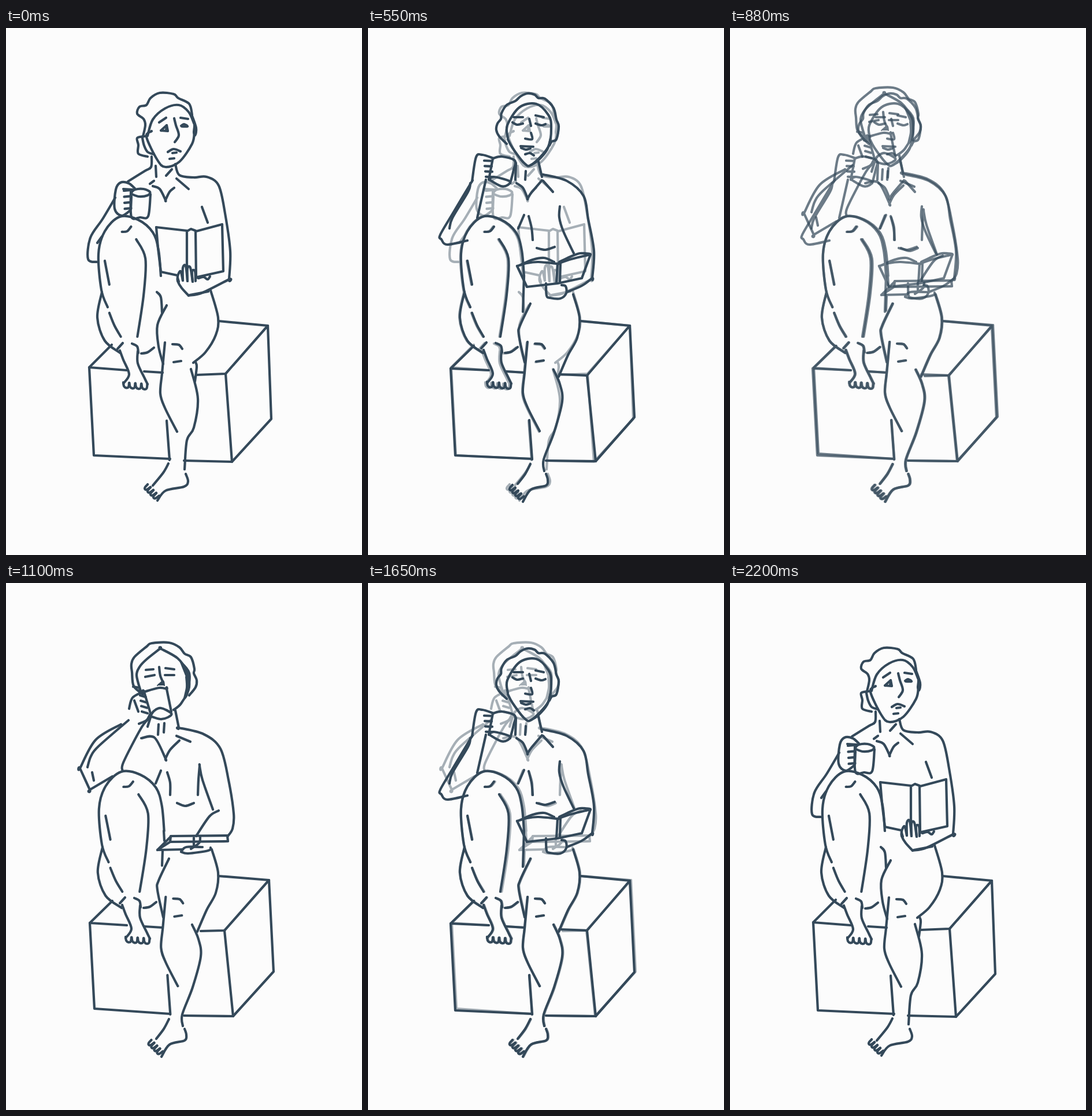
These frames come from a looping animation (616 px wide and 910 px high, 2420 ms). An HTML page:

```html
<!DOCTYPE html>
<html lang="en">
<head>
<meta charset="utf-8">
<title>Reader with a cup</title>
<style>
  html, body { margin: 0; width: 100%; height: 100%; overflow: hidden; background: #fcfcfc; }
  svg { display: block; width: 616px; height: 910px; }
  path { fill: none; stroke: #34495a; stroke-width: 4.2; stroke-linecap: round; stroke-linejoin: round; }
  path.solid { fill: #34495a; stroke-width: 2; }
</style>
</head>
<body>
<svg viewBox="0 0 616 910"></svg>
<script>
const stage = document.querySelector("svg");
const make = (tag, parent) =>
  parent.appendChild(document.createElementNS("http://www.w3.org/2000/svg", tag));
const [rest, lift, sip] = Array.from({ length: 3 }, () => make("g", stage));

function smooth(pts) {
  const at = i => pts[Math.max(0, Math.min(pts.length - 1, i))];
  const near = (p, a, b, k) => p.map((v, j) => (v + k * (b[j] - a[j]) / 6).toFixed(1));
  let d = "M" + pts[0];
  for (let i = 0; i < pts.length - 1; i++) {
    d += "C" + near(at(i), at(i - 1), at(i + 1), 1) + " "
      + near(at(i + 1), at(i), at(i + 2), -1) + " " + at(i + 1);
  }
  return d;
}

function trace(layer, pts, mark) {
  const path = make("path", layer);
  path.setAttribute("d", mark === "!" ? "M" + pts.join("L") : smooth(pts));
  if (mark === "#") path.classList.add("solid");
}

// Strokes are split by ";". "!" = straight lines, "#" = solid shape, otherwise a smooth curve.
function draw(layer, strokes, dx = 0, dy = 0, sx = 1) {
  for (const text of strokes.split(";")) {
    const pts = text.match(/\d+ \d+/g).map(pair => {
      const [x, y] = pair.split(" ").map(Number);
      return [164 + (x - 164) * sx + dx, y + dy];
    });
    trace(layer, pts, text.trim()[0]);
  }
}

function fingers(layer, x, y, dx, dy, w, h) {
  for (let i = 0; i < 4; i++) trace(layer, [[x + i * dx, y + i * dy], [x + i * dx + w, y + i * dy + h]]);
}

// Four small loops in a row, bulging towards (outX, outY).
function toes(layer, x, y, dx, dy, outX, outY) {
  for (let i = 0; i < 4; i++) {
    const point = (along, out) => [x + (i + along) * dx + out * outX, y + (i + along) * dy + out * outY];
    trace(layer, [point(0, 0), point(.1, .7), point(.45, 1), point(.85, .8), point(.95, 0)]);
  }
}

// Corner names: back left, front left, bottom left, bottom right, front right, far right, far bottom.
function box(layer, back, left, low, base, front, far, end, gap) {
  draw(layer, `!${back};!${left} 209 591;!239 593 271 595;!${gap} ${front} ${far} 368 506;
    !${left} ${low} 284 744;!308 747 ${base} ${front};!${base} ${end} ${far}`.replace(`!${back};!`, `!${back} `));
}

// Cup resting, book upright
draw(rest, `237 187 241 168 238 157 227 148 231 136 243 133 250 121 266 112 290 114 298 121 317 131 322 150;
  245 186 254 158 275 139 299 133 316 145 325 164;#321 146 330 172 328 186 324 181 325 168 322 156`);
draw(rest, `326 180 322 200 300 231 276 240 262 228 243 188 252 178;
  240 187 227 190 229 202 229 217 245 222;236 190 239 203 245 214 256 218`);
draw(rest, `265 163 277 155;!268 177 278 168 280 178 268 177;!278 168 277 177;302 155 315 157;
  303 169 308 166 314 170 304 170;291 156 294 168 299 185 292 197;280 214 290 209 302 213;288 216 295 215;283 226 291 225`);
draw(rest, `252 222 251 240 240 247 211 265;259 238 260 257;
  293 235 300 254 325 258 347 257 368 272 379 320 388 385 386 434 386 434 340 457 316 462;
  287 244 277 255;254 273 266 278 276 297 276 297 283 283 291 276;295 260 316 278;249 269 256 264;339 309 349 336`);
draw(rest, `216 283 217 326 232 327 246 325 250 287;217 284 223 279 238 278 249 283 245 289 230 291 218 287;
  223 277 212 268 198 267 190 279 188 312 200 324 215 315;203 278 219 279;217 291 216 313`);
fingers(rest, 204, 281, .5, 10.4, 11, -1);
draw(rest, `189 293 167 330 146 362 142 399 158 404;166 360 158 371`);
draw(rest, `!260 344 313 350;!260 344 263 380 268 421 296 427;!313 412 313 351 320 347 328 350 329 432;
  !329 351 374 339 376 420 331 430;299 438 297 429 302 420 306 436;306 436 306 414 311 411 314 437;
  314 437 314 415 319 414 323 438;323 438 322 420 327 420 328 437`);
draw(rest, `297 430 297 437 304 449 316 462;318 461 350 455;333 432 342 430 349 434 353 429;
  261 456 268 465 270 491;278 479 262 513 264 550 272 580;354 453 367 500 363 530 345 560 324 578`);
draw(rest, `320 589 332 640 325 690 313 712 309 762;328 577 330 585 327 610;
  281 752 272 768 254 790;311 770 315 783 308 792 276 799 262 816`);

// Cup raised, book lowered
draw(lift, `240 200 227 187 222 176 224 165 230 157 231 147 240 133 255 126 264 118 276 113 288 115 295 121 306 122
  321 138 326 158 330 170 326 192 318 196 314 203`);
draw(lift, `242 190 241 168 262 137 291 131 312 150 317 170 312 205 283 236 270 233 250 207 242 192;
  316 190 310 210 294 229 281 237`);
draw(lift, `252 154 268 154;290 151 304 154;250 163 258 167 268 165;290 165 300 168 307 166;279 157 282 169;
  282 181 284 192 272 191;264 204 286 205;265 207 273 210 281 208;272 218 280 216 287 220`);
draw(lift, `256 233 255 262;273 247 272 262;295 231 301 257;257 268 268 276 276 294 276 294 283 284 301 263;303 264 320 283;
  303 253 344 264 373 290 381 330 391 385 388 432 388 432 370 445 344 456;332 308 331 327 338 351 356 389;
  270 323 260 346;278 325 283 345 285 366;292 380 307 383 323 378`);
draw(lift, `216 225 232 222 254 229 252 245 246 268;216 225 209 262;210 262 217 257 244 264 242 271 230 273 210 262;
  217 225 198 219 187 223 180 265`);
fingers(lift, 201, 229, 1, 9.3, 12, .5);
draw(lift, `181 263 148 318 125 357 127 365 137 374 172 367;177 268 173 283 146 328 141 346;204 262 189 328`);
draw(lift, `!258 411 275 447 328 441 370 432 385 391;258 411 275 406 295 404 328 407 328 407 352 399 385 391;
  264 409 285 400 305 397 322 404;331 404 350 395 367 389 384 390;!328 407 326 441;!333 406 332 439;
  308 441 309 462 315 466 333 467 343 458 342 446 335 444`);

// Drinking, book flat
draw(sip, `237 192 221 178 218 154 217 140 222 128 243 110 252 104 282 103 300 111 309 122 320 128 326 148 325 156
  330 168 328 180 317 194`);
draw(sip, `234 190 226 160 231 145 243 132 267 113 267 113 297 130 312 152 317 180 303 208 290 219;
  #299 132 318 155 315 190 308 200 312 180 311 162;220 179 230 181 233 187;
  242 150 255 149;276 147 291 149;241 162 257 159;275 159 291 159;265 145 267 160 272 172;#262 177 272 169 274 177`);
draw(sip, `250 232 245 248;264 244 263 262;274 242 273 258;
  293 220 299 250 299 250 342 261 371 286 385 340 394 398 392 424 384 437;
  234 268 257 267 276 303 276 303 284 288 300 272;295 264 319 274;
  332 366 333 340 335 316 335 316 340 340 358 391;368 393 352 403 329 437`);
draw(sip, `268 324 259 346;279 327 284 345 284 366;296 380 310 385 325 380;
  250 225 239 188 239 188 265 181 278 183 278 183 286 222;250 230 256 221 268 216 286 225 280 232 267 235 250 230;
  213 217 219 198 239 187;222 203 229 222;230 243 243 237 249 227`);
fingers(sip, 232, 194, 1, 9.3, 10, 3);
draw(sip, `212 237 160 282 147 299 141 318;199 244 155 271 128 320 128 320 145 357 145 357 184 334;
  149 327 152 341;246 235 233 252 203 310 202 325`);
draw(sip, `!285 437 383 436 384 446 284 447 285 437;!285 438 262 461 306 460;!262 461 284 447;
  303 464 312 456 340 456;303 464 315 467 350 462 354 457;325 440 325 455;336 439 334 449 320 459`);

// Parts that hardly move, with a small shift or stretch for each pose
const bentLeg = `270 428 266 384 256 353 230 331 198 326 172 351 161 390 166 452 177 482;
  167 456 159 500 172 540 199 561;172 402 180 443;180 492 189 514 200 533;202 352 211 351 218 343;
  227 365 243 398 240 460 229 533`;
const ankle = `196 553 205 543;221 544 230 549 232 560;200 556 206 572 216 597 206 613;
  231 557 231 578 243 604 248 614;237 561 248 559 259 551`;
const shin = `276 542 271 595 268 630 276 655 297 696;289 545 300 546 306 553;291 576 304 574;279 677 284 745`;
const standing = `355 460 366 500 362 535 346 565 330 602;281 476 263 514 261 530 271 577;
  321 590 332 615 336 645 322 698 304 745 305 765;
  281 753 272 770 259 787;308 770 311 780 308 790 282 797 268 818`;

draw(rest, bentLeg, -1, 0, .99);
draw(lift, bentLeg);
draw(sip, bentLeg, 0, 0, 1.035);
draw(lift, "270 428 268 490");
draw(sip, "273 428 274 445;271 462 270 488");
[[rest, -3, 1], [lift, 0, 0], [sip, 1, 0]].forEach(([layer, dx, dy]) => {
  draw(layer, ankle, dx, dy);
  draw(layer, shin, dx / 3, dy);
  toes(layer, 206 + dx, 611 + dy, 10.5, .8, 0, 9);
  toes(layer, 250 + dx * 1.6, 789 - dy, 5, 5, -7, 6);
});
draw(lift, standing);
draw(sip, standing, 1);

box(rest, "183 547", "144 586", "152 738", "391 749", "380 597", "453 514", "459 675", "330 599");
box(lift, "183 549", "143 588", "151 738", "394 748", "379 600", "453 514", "461 672", "331 598");
box(sip, "184 549", "145 587", "153 735", "393 748", "378 600", "455 513", "463 671", "337 601");

// Each row: tick (110 ms), then the opacity of the three poses.
const faint = 0.43, half = 0.72, ticks = 22;
const there = [
  [0, 1, 0, 0], [3, 1, faint, 0], [4, half, half, 0], [5, faint, 1, 0], [6, 0, 1, 0],
  [7, 0, 1, faint], [8, 0, half, half], [9, 0, faint, 1], [10, 0, 0, 1]
];
const back = there.slice(0, -1).reverse().map(([, ...mix], i) => [13 + i, ...mix]);
const steps = [...there, ...back];

[rest, lift, sip].forEach((layer, i) => {
  const frames = steps.map(row => ({ offset: row[0] / ticks, opacity: row[i + 1], easing: "steps(1, end)" }));
  frames.push({ offset: 1, opacity: steps[0][i + 1] });
  layer.animate(frames, { duration: ticks * 110, iterations: Infinity });
});
</script>
</body>
</html>
```
